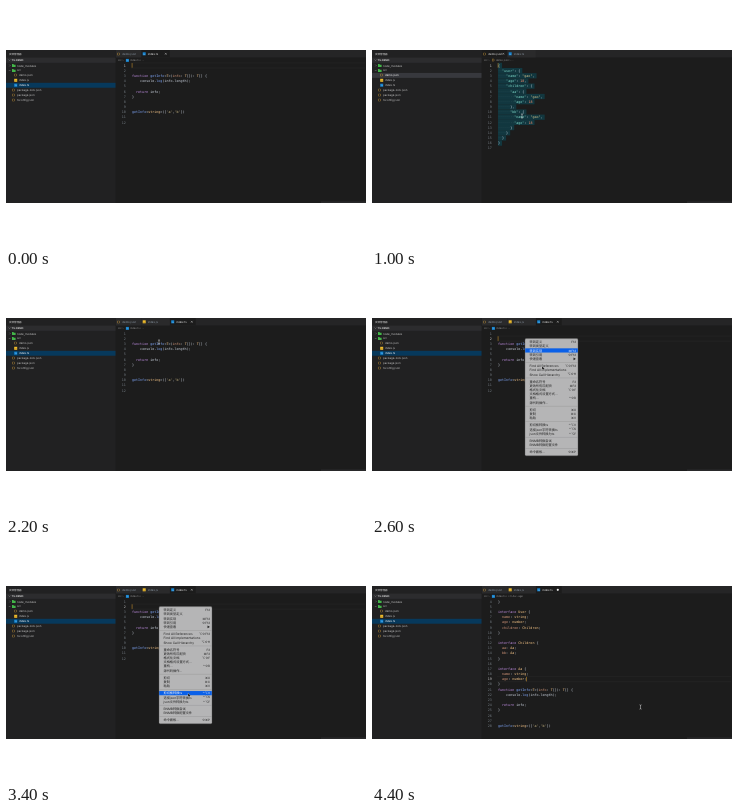
Recreate the animation shown at these times as an HTML page. Size 360 by 240 pixels, loop 4.6 s.

```html
<!DOCTYPE html>
<html lang="zh">
<head>
<meta charset="utf-8">
<title>Editor demo</title>
<style>
  html, body { margin: 0; width: 100%; height: 100%; overflow: hidden; background: #fff; }
  svg { display: block; width: 100vw; height: 100vh; }
  text { font-family: Inter, "Noto Sans CJK SC", "Noto Sans CJK", sans-serif; text-rendering: geometricPrecision; }
  .code { font-family: "DejaVu Sans Mono", monospace; font-size: 3.37px; }
  .key { fill: #7fdbca; } .str { fill: #d9c58d; } .word { fill: #c792ea; }
  .type { fill: #ffcb8b; } .fn { fill: #82aaff; } .num { fill: #f78c6c; } .arg { fill: #d99a7c; }
</style>
</head>
<body>
<svg id="stage" viewBox="0 0 360 240"></svg>
<script>
const STEP = 200, LOOP = 4600;
const CHAR = 2.03, LINE = 5.18, CODE_X = 126, CODE_Y = 59.4;

const userJson = `{
  "user": {
    "name": "gao",
    "age": 18,
    "children": {
      "aa": {
        "name": "gao",
        "age": 18
      },
      "bb": {
        "name": "gao",
        "age": 18
      }
    }
  }
}
`.split('\n');

const generic = `function getInfo<T>(info: T[]): T[] {
    console.log(info.length);

  return info;
}


getInfo<string>(['a','b'])`.split('\n');

const interfaces = `
interface RootObject {
  user: User;
}

interface User {
  name: string;
  age: number;
  children: Children;
}

interface Children {
  aa: Aa;
  bb: Aa;
}

interface Aa {
  name: string;
  age: number;
}`.split('\n');

const plainTs = ['', '', ...generic, '', ''];
const typedTs = [...interfaces, ...generic];

const escape = s => s.replace(/&/g, '&amp;').replace(/</g, '&lt;');
const rect = (x, y, w, h, fill, extra = '') =>
  `<rect x="${x}" y="${y}" width="${w}" height="${h}" fill="${fill}" ${extra}/>`;
const path = (d, stroke, width = .4, fill = 'none') =>
  `<path d="${d}" stroke="${stroke}" stroke-width="${width}" fill="${fill}"/>`;
const label = (x, y, s, fill, size = 2.8, extra = '') =>
  `<text x="${x}" y="${y + size * .36}" font-size="${size}" fill="${fill}" ${extra}>${escape(s)}</text>`;

const classes = ['key', 'str', 'word', 'type', 'fn', 'num', 'arg'];
const tokens = /("\w+"(?=:))|("\w+"|'\w+')|\b(function|interface|return)\b|\b(string|number|User|Children|Aa|RootObject|T)\b|\b(getInfo|log)\b|(\d+)|\b(info(?=:)|\w+(?=: [A-Zsn]))/g;

function paint(source) {
  let out = '', last = 0;
  for (const m of source.matchAll(tokens)) {
    const kind = classes[m.slice(1).findIndex(Boolean)];
    out += escape(source.slice(last, m.index)) + `<tspan class="${kind}">${m[0]}</tspan>`;
    last = m.index + m[0].length;
  }
  return out + escape(source.slice(last));
}

function icon(kind, x, y) {
  if (kind === 'json') return label(x - 1.6, y, '{}', '#dca33c', 3, 'font-weight="600"');
  if (kind === 'folder') return path(`M${x - 1.7} ${y - 1.4}h1.4l.5.6h1.7v2.4h-3.6z`, 'none', 0, '#43b649');
  const [bg, fg] = kind === 'js' ? ['#f0bd2d', '#5b470b'] : ['#1684d0', '#d8efff'];
  return rect(x - 1.5, y - 1.5, 3, 3, bg) + label(x - .9, y + .4, kind.toUpperCase(), fg, 1.5);
}

const kindOf = name => name.split('.').pop();

const tree = [
  ['node_modules', 'folder', 0], ['src', 'folder', 0], ['demo.json', 'json', 1],
  ['index.js', 'js', 1], ['index.ts', 'ts', 1], ['package-lock.json', 'json', 0],
  ['package.json', 'json', 0], ['tsconfig.json', 'json', 0]
];

function sidebar({ file, hover, focus }) {
  let out = rect(0, 44, 109.5, 153, '#212122') + label(3, 48, '资源管理器', '#d4d4d4', 2.5) +
    rect(0, 51.6, 109.5, 5.2, '#2c2c2e') + path('M2.6 53.6l.9.9.9-.9', '#bbb', .35) +
    label(5.5, 54.2, 'TS-DEMO', '#d0d0d0', 2.5, 'font-weight="700"');
  if (hover) {
    out += [86, 92, 98, 104].map((x, i) => i === 3
      ? rect(x - 1, 53.1, 2.2, 2.2, 'none', 'stroke="#ccc" stroke-width=".35"')
      : path(`M${x - 1.2} 53h1.6l.8.8v1.7h-2.4zM${x - .5} 54.3h1.2`, '#ccc', .35)).join('');
  }
  tree.forEach(([name, kind, depth], i) => {
    const y = 59.5 + i * 4.93;
    if (name === file) out += rect(0, y - 2.4, 109.5, 4.9, focus ? '#07395c' : '#37383d');
    if (kind === 'folder') out += path(i ? `M2.8 ${y - .4}l.9.9.9-.9` : `M3.3 ${y - .9}l.9.9-.9.9`, '#aaa', .35);
    const x = depth ? 9.7 : 7.7;
    out += icon(kind, x, y) + label(x + 3.3, y, name, name === file ? '#fff' : '#c4c4c4');
  });
  return out;
}

function tabs({ open, file, dirty }) {
  const edges = [110, 135.5, 164, 190];
  let out = rect(109.5, 44, 250.5, 7.4, '#252526');
  open.forEach((name, i) => {
    const x = edges[i], active = name === file;
    out += rect(x, 44, edges[i + 1] - x - .3, 7.4, active ? '#1c1c1c' : '#2a2a2b');
    out += icon(kindOf(name), x + 2.7, 47.8) + label(x + 6.3, 47.8, name, active ? '#eee' : '#8b98a5');
    if (!active) return;
    const cx = edges[i + 1] - 4.2;
    out += dirty ? `<circle cx="${cx}" cy="47.8" r="1.1" fill="#eee"/>`
      : path(`M${cx - .9} 46.9l1.8 1.8m0-1.8l-1.8 1.8`, '#ddd', .4);
  });
  return out;
}

function editor({ file, lines, scroll = 0, caret, selected, crumb = '…' }) {
  let out = rect(109.5, 44, 250.5, 153, '#1c1c1c');
  out += label(112, 54.4, 'src  ›', '#929292', 2.6) + icon(kindOf(file), 121.4, 54.4) +
    label(124, 54.4, `${file}  ›  ${crumb}`, '#929292', 2.6);
  lines.forEach((line, i) => {
    const y = CODE_Y + (i - scroll) * LINE;
    if (y < 57 || y > 194) return;
    const active = i + 1 === caret;
    const indent = line.search(/\S|$/), x = CODE_X + indent * CHAR;
    if (active && !selected)
      out += path(`M${CODE_X - 1} ${y - 2.5}H359M${CODE_X - 1} ${y + 2.6}H359`, '#303030', .35);
    if (selected && line) {
      out += rect(CODE_X, y - 2.6, (line.length + 1) * CHAR, LINE + .05, '#12373f');
      out += `<text class="code" x="${CODE_X}" y="${y + 1.2}" fill="#45666b">${'·'.repeat(indent)}</text>`;
    }
    out += `<text class="code" x="119.8" y="${y + 1.2}" text-anchor="end" fill="${active ? '#c5c5c5' : '#737b82'}">${i + 1}</text>`;
    out += `<text class="code" x="${x}" y="${y + 1.2}" fill="#d6deeb">${paint(line.trim())}</text>`;
    if (active) out += rect(CODE_X + (selected ? 0 : line.length * CHAR) - .2, y - 2.3, .5, 4.6, '#e2a22f');
  });
  return out + rect(315, 195.4, 45, 1.6, '#29292a');
}

const menuGroups = [
  ['转到定义|F12', '转到类型定义|', '转到实现|⌘F12', '转到引用|⇧F12', '快速查看|▶'],
  ['Find All References|⌥⇧F12', 'Find All Implementations|', 'Show Call Hierarchy|⌥⇧H'],
  ['重命名符号|F2', '更改所有匹配项|⌘F2', '格式化文档|⌥⇧F', '文档格式设置方式...|', '重构...|⌃⇧R', '源代码操作...|'],
  ['剪切|⌘X', '复制|⌘C', '粘贴|⌘V'],
  ['剪切板转换ts|⌃⌥V', '选择json字符转换ts|⌃⌥S', 'json文件转换为ts|⌃⌥F'],
  ['RNMB转换尝试|', 'RNMB转换配置文件|'],
  ['命令面板...|⇧⌘P']
];

function menu(picked) {
  let y = 68, out = rect(153, 64.6, 53, 117.2, '#b5b5b6', 'rx="1.3" stroke="#555" stroke-width=".35"');
  menuGroups.forEach((group, g) => {
    if (g) {
      out += rect(153.3, y - .85, 52.4, .4, '#929293');
      y += 2.85;
    }
    group.forEach(item => {
      const [name, keys] = item.split('|'), on = name === picked;
      if (on) out += rect(153.2, y - 2.1, 52.6, 4.2, '#0a60e8');
      const ink = on ? '#fff' : '#202020';
      out += label(157.5, y, name, ink, 3.2) + label(204, y, keys, ink, 3, 'text-anchor="end"');
      y += 4.22;
    });
  });
  return out;
}

function pointer(kind, x, y) {
  if (kind === 'hand')
    return path(`M${x - .7} ${y - 1.8}h.8v1.5l1.6.4v1.4l-.6 1h-1.7l-1.2-1.7.5-.4.6.5z`, '#222', .25, '#fff');
  if (kind === 'arrow')
    return path(`M${x} ${y - 2}v4l1-.9.7 1.5.6-.3-.7-1.4h1.3z`, '#fff', .25, '#111');
  return path(`M${x - 1} ${y - 2.2}q1 0 1 .7q0-.7 1-.7M${x} ${y - 1.5}v3M${x - 1} ${y + 2.2}q1 0 1-.7q0 .7 1 .7`, '#ddd', .5);
}

const twoTabs = ['demo.json', 'index.ts'], threeTabs = ['demo.json', 'index.js', 'index.ts'];
const views = {
  start: { open: twoTabs, file: 'index.ts', lines: plainTs, caret: 1, focus: true },
  json: { open: twoTabs, file: 'demo.json', lines: userJson, caret: 1, selected: true },
  script: { open: threeTabs, file: 'index.js', lines: [''], caret: 1, focus: true, hover: true },
  plain: { open: threeTabs, file: 'index.ts', lines: plainTs, caret: 2, focus: true },
  typed: { open: threeTabs, file: 'index.ts', lines: typedTs, caret: 19, focus: true, dirty: true, crumb: '•○ Aa  ›  age' }
};

// start time, view, pointer, changes to the view
const timeline = [
  [0, 'start', null],
  [200, 'start', ['beam', 197, 157]],
  [400, 'start', ['hand', 60, 84], { hover: true }],
  [600, 'json', ['hand', 52, 71.5], { hover: true, focus: true }],
  [800, 'json', ['beam', 165, 126]],
  [1000, 'json', ['beam', 150, 110]],
  [1200, 'json', ['beam', 122, 95]],
  [1400, 'json', ['hand', 66, 83], { hover: true }],
  [1600, 'json', ['hand', 49, 76], { hover: true }],
  [1800, 'script', ['hand', 47, 76]],
  [2000, 'script', ['hand', 45, 79]],
  [2200, 'plain', ['beam', 153, 68], { caret: 0 }],
  [2400, 'plain', ['beam', 153, 65]],
  [2600, 'plain', ['arrow', 170, 94], { picked: '转到实现' }],
  [2800, 'plain', ['arrow', 174, 117], { picked: '格式化文档' }],
  [3000, 'plain', ['arrow', 179, 141], { picked: '复制' }],
  [3200, 'plain', ['arrow', 182, 153], { picked: '剪切板转换ts' }],
  [3600, 'typed', ['beam', 182, 153]],
  [3800, 'typed', ['beam', 182, 153], { scroll: 3 }],
  [4400, 'typed', ['beam', 268.5, 165], { scroll: 3 }]
];

const stage = document.getElementById('stage');
let shown;

function draw() {
  const time = performance.now() % LOOP;
  const entry = timeline.findLast(([start]) => start <= time);
  if (entry !== shown) {
    const [, view, mouse, change] = shown = entry;
    const state = { ...views[view], ...change };
    stage.innerHTML = rect(0, 44, 360, 153, '#1c1c1c') + editor(state) + tabs(state) + sidebar(state) +
      (state.picked ? menu(state.picked) : '') + (mouse ? pointer(...mouse) : '');
  }
  requestAnimationFrame(draw);
}
draw();
</script>
</body>
</html>
```
